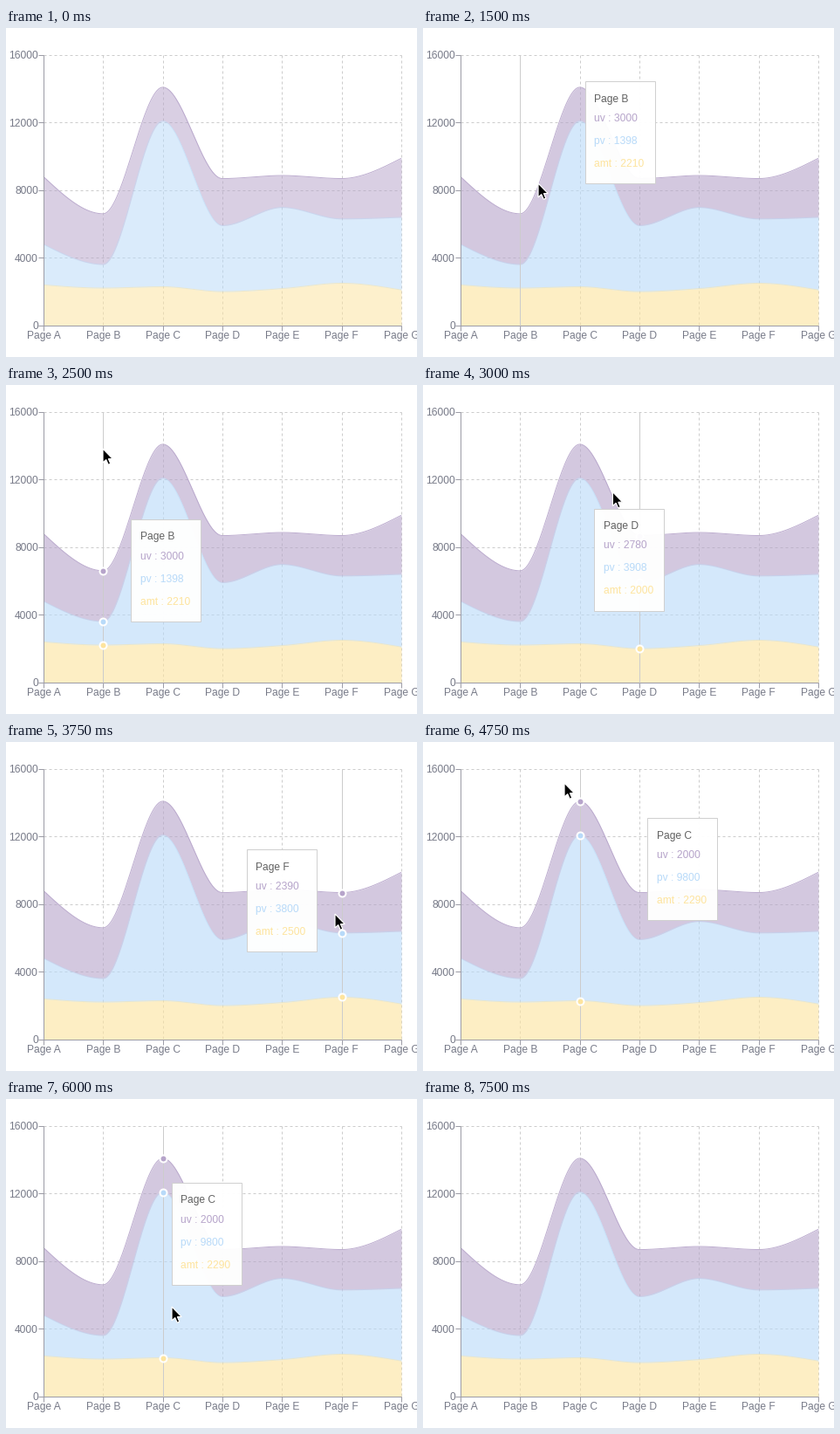
A matplotlib script for the animation above (8.25 s loop, 471 by 377 pixels).

```python
import numpy as np
import matplotlib.pyplot as plt
from matplotlib.animation import FuncAnimation
from matplotlib.patches import Polygon, Rectangle

W, H, DPI = 471, 377, 100
PX = 72 / DPI
LEFT, RIGHT, TOP, BASE = 43, 453, 30.9, 340.9
Y_MAX = 16000
FRAMES, STEP_MS = 33, 250
FIRST, LAST = 6, 26  # steps with the pointer on stage

PAGES = ["Page " + c for c in "ABCDEFG"]
SERIES = {  # bottom to top
    "amt": ([2400, 2210, 2290, 2000, 2181, 2500, 2100], "#fde49e"),
    "pv": ([2400, 1398, 9800, 3908, 4800, 3800, 4300], "#b8daf9"),
    "uv": ([4000, 3000, 2000, 2780, 1890, 2390, 3490], "#b6a4ca"),
}
# stops of the hover path: step, pointer x, y, tooltip x, y
STOPS = np.array([
    (6, 132, 178, 186, 61),
    (10, 111, 73, 143, 154),
    (15, 377, 197, 276, 123),
    (16, 428, 178, 350, 180),
    (19, 162, 47, 257, 87),
    (21, 116, 128, 121, 140),
    (24, 190, 238, 190, 96),
    (26, 172, 70, 190, 96),
])
ARROW = np.array([(0, 0), (0, 16), (3.7, 12.6), (6.2, 18.3), (8.8, 17.2),
                  (6.4, 11.6), (11.3, 11.6)])
AXIS, TEXT = "#9c9ca6", "#777a88"

plt.rcParams["font.family"] = "Liberation Sans"
fig = plt.figure(figsize=(W / DPI, H / DPI), dpi=DPI, facecolor="white")
ax = fig.add_axes([0, 0, 1, 1])
ax.set_xlim(0, W)
ax.set_ylim(H, 0)
ax.axis("off")

xs = np.linspace(LEFT, RIGHT, len(PAGES))


def to_y(value):
    return BASE - np.asarray(value) / Y_MAX * (BASE - TOP)


def monotone(x, y, n=40):
    """Monotone cubic curve through the points."""
    h, s = np.diff(x), np.diff(y) / np.diff(x)
    p = (s[:-1] * h[1:] + s[1:] * h[:-1]) / (h[:-1] + h[1:])
    size = np.minimum(np.minimum(abs(s[:-1]), abs(s[1:])), 0.5 * abs(p))
    mid = (np.sign(s[:-1]) + np.sign(s[1:])) * size
    m = np.r_[(3 * s[0] - mid[0]) / 2, mid, (3 * s[-1] - mid[-1]) / 2]
    xx = np.linspace(x[0], x[-1], n * len(h) + 1)
    i = np.minimum(np.arange(len(xx)) // n, len(h) - 1)
    t = (xx - x[i]) / h[i]
    yy = ((1 + 2 * t) * (1 - t) ** 2 * y[i] + t * (1 - t) ** 2 * h[i] * m[i]
          + t * t * (3 - 2 * t) * y[i + 1] + t * t * (t - 1) * h[i] * m[i + 1])
    return xx, yy


def line(x, y, color, z, **kw):
    return ax.plot(x, y, color=color, lw=PX, zorder=z,
                   solid_capstyle="butt", **kw)[0]


def label(x, y, text, color, ha="left", z=5):
    return ax.text(x, y, text, color=color, ha=ha, va="baseline",
                   fontsize=12 * PX, zorder=z)


# grid, axes and labels
DASH = dict(dashes=(3, 3), dash_capstyle="butt")
for value in range(0, Y_MAX + 1, 4000):
    y = to_y(value)
    line([LEFT, RIGHT], [y, y], "#cccccc", 1, **DASH)
    line([LEFT - 6, LEFT], [y, y], AXIS, 4)
    label(LEFT - 6, y + 4.2, str(value), TEXT, "right")
for x, page in zip(xs, PAGES):
    line([x, x], [TOP, BASE], "#cccccc", 1, **DASH)
    line([x, x], [BASE, BASE + 6], AXIS, 4)
    label(x, 356, page, TEXT, "center")
line([LEFT, LEFT], [TOP, BASE], AXIS, 4)
line([LEFT, RIGHT], [BASE, BASE], AXIS, 4)

# stacked areas
fills, tops = [], {}
total = np.zeros(len(PAGES))
lower = BASE
for name, (values, color) in SERIES.items():
    total = total + values
    tops[name] = to_y(total)
    cx, cy = monotone(xs, tops[name])
    fills.append(ax.fill_between(cx, lower, cy, color=color, lw=0, zorder=2))
    line(cx, cy, color, 3, alpha=0.9 if name == "uv" else 0.5)
    lower = cy

# hover parts
guide = line([0, 0], [TOP, BASE], "#cccccc", 6)
dots = {name: ax.plot([0], [0], "o", ms=8 * PX, mfc=color, mec="white",
                      mew=2 * PX, zorder=7)[0]
        for name, (_, color) in SERIES.items()}
box = ax.add_patch(Rectangle((0, 0), 80, 117, fc=(1, 1, 1, 0.97),
                             ec="#d0d0d0", lw=PX, zorder=8))
title = label(0, 0, "", "#606060", z=9)
rows = {name: label(0, 0, "", SERIES[name][1], z=9)
        for name in reversed(SERIES)}
pointer = ax.add_patch(Polygon(ARROW, closed=True, fc="black", ec="white",
                               lw=1.2 * PX, zorder=10))
hover = [guide, box, title, pointer, *rows.values()]


def update(i):
    for fill in fills:
        fill.set_alpha(0.52 + 0.08 * min(i / 3, 1))

    active = FIRST <= i <= LAST
    for part in hover:
        part.set_visible(active)
    for dot in dots.values():
        dot.set_visible(active and i > FIRST)
    if not active:
        return

    px, py, tx, ty = (np.interp(i, STOPS[:, 0], col) for col in STOPS.T[1:])
    k = int(np.argmin(abs(xs - px)))
    guide.set_xdata([xs[k], xs[k]])
    for name, dot in dots.items():
        dot.set_data([xs[k]], [tops[name][k]])
    box.set_xy((tx, ty))
    title.set_position((tx + 10.5, ty + 23.5))
    title.set_text(PAGES[k])
    for n, (name, row) in enumerate(rows.items()):
        row.set_position((tx + 10.5, ty + 45.7 + 26 * n))
        row.set_text(f"{name} : {SERIES[name][0][k]}")
    pointer.set_xy(ARROW + (px, py))


anim = FuncAnimation(fig, update, frames=FRAMES, interval=STEP_MS,
                     repeat=True, repeat_delay=0, blit=False)
plt.show()
```
